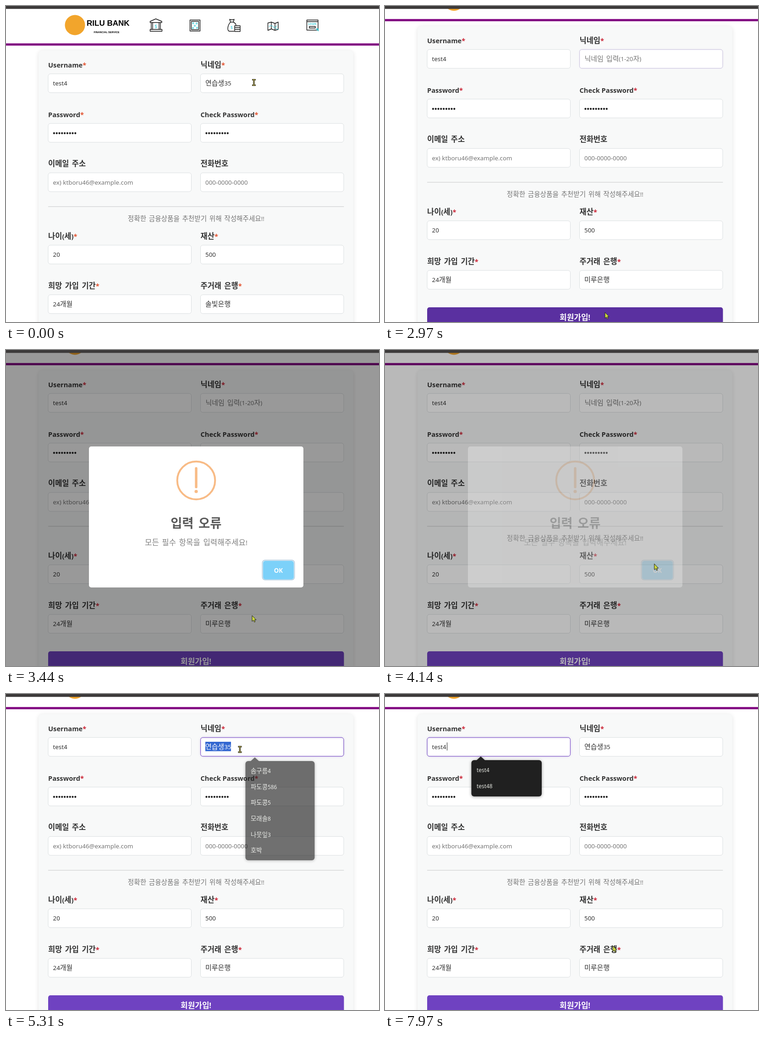
An HTML page that plays this animation: 814x688 px, repeating every 8 s.

```html
<!DOCTYPE html>
<html lang="ko">
<head>
<meta charset="utf-8">
<title>Sign-up form</title>
<style>
  html, body { margin: 0; width: 100%; height: 100%; overflow: hidden; background: #fff; }
  svg { display: block; }
  text { font-family: "Noto Sans", "Open Sans", sans-serif; fill: #333; }
  .korean { word-spacing: .17em; }
  .ko { font-family: "Noto Sans CJK KR", "Noto Sans CJK", sans-serif; }
  .bold { font-weight: 700; }
  .star { fill: var(--star); font-weight: 600; }
  .hint { fill: #757575; }
  .title { fill: #595959; }
  .message { fill: #808080; }
  .white { fill: #fff; }
  .middle { text-anchor: middle; }
  .logo { font-family: "Liberation Sans", Arial, sans-serif; font-weight: 700; fill: #000; }
  .field { fill: #fff; stroke: #dbdfe1; }
  .focus { fill: none; stroke: #7446c6; filter: drop-shadow(0 0 2px #6f42c166); }
  .card { fill: #f8f9f9; filter: drop-shadow(0 1px 4px #0000001c); }
  .line { fill: none; stroke: #151515; stroke-width: 1.4; stroke-linejoin: round; }
  .teal { fill: none; stroke: #35cbd8; stroke-width: 1.2; }
  .tealFill { fill: #35cbd8; }
  .list { filter: drop-shadow(0 1px 3px #0006); }
  .list text { fill: #e4e6e0; }
</style>
</head>
<body>
<script>
const LOOP = 8000, SCROLL = 53;
const LEFT = 92, RIGHT = 424.5, FIELD_W = 312.5, FIELD_H = 41;

// Hangul is set slightly larger than Latin so both look the same size.
function text(x, middleY, string, size, cls = '', star = '') {
  const runs = string.replace(/[가-힣]+/g, run => `<tspan class="ko" font-size="${size}">${run}</tspan>`);
  const mark = star && `<tspan class="star">${star}</tspan>`;
  const script = runs === string ? '' : 'korean';
  return `<text x="${x}" y="${middleY + size * .35}" font-size="${size * .89}" class="${cls} ${script}">${runs}${mark}</text>`;
}
const box = (x, y, w, h, attrs, r = 5) => `<rect x="${x}" y="${y}" width="${w}" height="${h}" rx="${r}" ${attrs}/>`;
const path = (d, cls = 'line') => `<path d="${d}" class="${cls}"/>`;
const frame = (x, y, attrs) => box(x, y - 20.5, FIELD_W, FIELD_H, attrs);

function field(x, labelY, label, star, content) {
  const y = labelY + 40.2;
  return text(x, labelY, label, 16.5, 'bold', star) + frame(x, y, 'class="field"') + content(x + 10.5, y);
}
const value = string => (x, y) => text(x, y, string, 15);
const hint = string => (x, y) => text(x, y, string, 15, 'hint');
const dots = (x, y) => Array.from({ length: 9 }, (_, i) =>
  `<circle cx="${x + 2.4 + i * 5.8}" cy="${y + .8}" r="2.15" fill="#222"/>`).join('');

function suggestions(id, x, y, w, h, names) {
  return `<g id="${id}" class="list">${box(x, y, w, h, 'fill="#202020"', 6)}
    <path d="M${x + 11} ${y + .5}l9.5-8.5 9.5 8.5z" fill="#202020"/>
    ${names.map((name, i) => text(x + 11.5, y + 21.5 + i * 34.6, name, 13.4)).join('')}</g>`;
}

const header = `
  <rect y="81.4" width="814" height="4.8" fill="#800080"/>
  <circle cx="150.5" cy="41.5" r="22" fill="#f2a52c"/>
  <text x="176" y="43" font-size="17" class="logo">RILU BANK</text>
  <text x="191.5" y="59" font-size="5.6" class="logo">FINANCIAL SERVICE</text>
  ${path('M314.5 36V33.5L327 28l13 5.5V36ZM317 36V51M320 36V51M334 36V51M337 36V51M314.5 51H340.500V55H314.500Z')}
  <text x="327" y="48" font-size="10" class="tealFill middle">$</text>
  ${path('M401.5 30.5H423.5V54.5H401.5ZM404.5 33.5H420.5V51.5H404.5Z')}
  ${[[408.5, 37.5], [416, 38], [412, 43], [408, 48], [417, 47.5]].map(([x, y]) =>
    `<circle cx="${x}" cy="${y}" r="1.5" class="teal"/>`).join('')}
  ${path('M490 35C483 42 482 55 488 55H498M496 35Q502 38 502 42M490 35H497M490 35L488 29Q493 31 498 29L496 35M499 43H511V55.5H499ZM499 47H511M499 51H511')}
  <text x="492.5" y="50" font-size="9" class="tealFill middle">$</text>
  ${path('M571.5 37L579 35 587 38 594 35V51L587 53 579 50 571.5 53ZM579 35V50M587 38V53')}
  <g id="pin">${path('M574 45Q579 40 583 45T591 43M588 49L595 51', 'teal')}</g>
  ${path('M656.5 30.5H681V52.5H656.5ZM656.5 34H681M662 44.5H675V48H662Z')}
  <text x="668.5" y="41" font-size="5.5" class="tealFill middle bold">LOGIN</text>
  <path id="pointer" d="M0 0L6 2 4 3.5 6 6 4.5 7 3 4.5 1.5 6Z" class="tealFill"/>`;

const form = `
  ${box(71, 97, 687, 700, 'class="card"', 9)}
  ${field(LEFT, 128, 'Username', '*', value('test4'))}
  ${field(RIGHT, 128, '닉네임', '*', () => '')}
  ${field(LEFT, 236, 'Password', '*', dots)}
  ${field(RIGHT, 236, 'Check Password', '*', dots)}
  ${field(LEFT, 343.5, '이메일 주소', '', hint('ex) ktboru46@example.com'))}
  ${field(RIGHT, 343.5, '전화번호', '', hint('000-0000-0000'))}
  <path d="M92 436.8H737.5" stroke="#c6c8c9"/>
  ${text(414.8, 463, '정확한 금융상품을 추천받기 위해 작성해주세요!!', 14.6, 'hint middle')}
  ${field(LEFT, 501, '나이(세)', '*', value('20'))}
  ${field(RIGHT, 501, '재산', '*', value('500'))}
  ${field(LEFT, 609, '희망 가입 기간', '*', value('24개월'))}
  ${field(RIGHT, 609, '주거래 은행', '*', () => '')}
  <g id="bankBefore">${text(435, 649.2, '솔빛은행', 15)}</g>
  <g id="bankAfter">${text(435, 649.2, '미루은행', 15)}</g>
  ${box(LEFT, 709, 645.5, 45, 'id="submit"')}
  ${text(414.5, 731.5, '회원가입!', 17, 'bold white middle')}
  ${frame(RIGHT, 168.2, 'id="nickFocus" class="focus"')}
  ${frame(LEFT, 168.2, 'id="userFocus" class="focus"')}
  <g id="nickHint">${text(435.5, 167.5, '닉네임 입력(1-20자)', 15, 'hint')}</g>
  <rect id="selection" x="435" y="157" width="56" height="20.5" fill="#3367d1"/>
  <g id="nickDark">${text(435, 167.5, '연습생35', 15)}</g>
  <g id="nickLight">${text(435, 167.5, '연습생35', 15, 'white')}</g>
  <path id="nickCaret" d="M435.5 158.5V177" stroke="#222"/>
  <path id="userCaret" d="M135.5 158.5V176" stroke="#222"/>
  ${suggestions('nickList', 522.5, 199, 151, 216, ['솜구름4', '파도콩586', '파도콩5', '모래솔8', '나뭇잎3', '호박'])}
  ${suggestions('userList', 188.5, 197, 153.5, 79, ['test4', 'test48'])}`;

const dialog = `
  <rect id="shade" y="6" width="814" height="682"/>
  <g id="dialog">
    ${box(181, 210, 468, 307, 'fill="#fff"')}
    <g fill="#f8bb86">
      <circle cx="415" cy="284" r="41.3" fill="none" stroke="#f8bb86" stroke-width="4"/>
      ${box(412.3, 255, 5.4, 46, '', 2.5)}
      <circle cx="415" cy="308" r="3.6"/>
    </g>
    ${text(414.8, 377.5, '입력 오류', 27.4, 'bold title middle')}
    ${text(415, 419, '모든 필수 항목을 입력해주세요!', 16.8, 'message middle')}
    ${box(559.5, 457.5, 70, 43, 'fill="#fff" stroke="#b9d2e4" stroke-width="2"', 6)}
    ${box(561, 459, 67, 40.5, 'fill="#7cd1f9"')}
    ${text(594.5, 480, 'OK', 15, 'bold white middle')}
  </g>`;

document.body.innerHTML = `<svg width="814" height="688" viewBox="0 0 814 688">
  <rect width="814" height="688" fill="#fff"/>
  <g id="page">${header}${form}</g>
  ${dialog}
  <rect width="814" height="6.3" fill="#3c3a3a"/>
  <path id="arrow" d="M0 0V13L3 10.3 5 14.5 7 13.6 5.2 9.5H9Z" fill="#cbd83f" stroke="#222"/>
  <g id="beam" fill="none">
    <path d="M-4-6H4M0-6V6M-4 6H4" stroke="#222" stroke-width="3.2"/>
    <path d="M-3.5-6H3.5M0-6V6M-3.5 6H3.5" stroke="#d8c84a"/>
  </g>
</svg>`;

const el = Object.fromEntries([...document.querySelectorAll('[id]')].map(node => [node.id, node]));
const smooth = u => u * u * (3 - 2 * u);
const ramp = (t, from, to) => smooth(Math.min(1, Math.max(0, (t - from) / (to - from))));
const during = (t, from, to) => t >= from && t < to;
const fade = (id, alpha) => el[id].setAttribute('opacity', +alpha);
const move = (id, x, y) => el[id].setAttribute('transform', `translate(${x} ${y})`);
const blink = (t, from, to) => during(t, from, to) && (t - from) % 1060 < 530;

// time, x, y, shape
const mouse = [
  [0, 541, 166.5, 'beam'], [1500, 541, 166.5, 'beam'], [1820, 581, 255.5, 'beam'],
  [1950, 580, 275, 'arrow'], [2650, 480, 667, 'arrow'], [3150, 480, 667, 'arrow'],
  [3440, 537, 578, 'arrow'], [3800, 590, 474, 'arrow'], [4040, 590, 474, 'arrow'],
  [4280, 584, 452, 'arrow'], [5030, 520, 138, 'beam'], [5200, 510.5, 120.5, 'beam'],
  [5860, 510, 121, 'arrow'], [6380, 228, 153, 'arrow'], [6680, 228, 153, 'beam'],
  [6760, 230, 118, 'beam'], [7000, 230, 118, 'arrow'], [7430, 497, 208, 'arrow'],
  [7700, 540, 370, 'arrow'], [7970, 497, 548, 'arrow'], [LOOP, 497, 548, 'arrow']];

function drawMouse(t) {
  const i = mouse.findIndex(key => key[0] > t);
  const [t0, x0, y0, shape] = mouse[i - 1], [t1, x1, y1] = mouse[i];
  const u = ramp(t, t0, t1);
  for (const id of ['arrow', 'beam']) {
    fade(id, id === shape);
    move(id, x0 + (x1 - x0) * u, y0 + (y1 - y0) * u);
  }
}

function popScale(t) {
  const u = (t - 3050) / 300;
  if (u < .45) return .5 + .55 * ramp(u, 0, .45);
  if (u < .8) return 1.05 - .1 * ramp(u, .45, .8);
  return .95 + .05 * ramp(u, .8, 1);
}

function draw(now) {
  const t = now % LOOP;
  move('page', 0, -SCROLL * ramp(t, 2050, 2250));
  document.body.style.setProperty('--star', t < 2050 ? '#e2522f' : '#cb2536');

  const swing = (1 - Math.cos(t / 1820 * Math.PI)) / 2;
  move('pointer', 677 - 6 * swing, 48 - 3 * swing);
  move('pin', 0, 2 * swing);

  const nickFocus = ramp(t, 150, 300) - ramp(t, 2850, 3020) + ramp(t, 5060, 5200) - ramp(t, 6150, 6300);
  const empty = during(t, 700, 5200);
  const selected = during(t, 350, 700) || during(t, 5200, 6150);
  fade('nickFocus', nickFocus);
  fade('nickHint', during(t, 2850, 5060));
  fade('selection', selected);
  fade('nickLight', selected);
  fade('nickDark', !empty && !selected);
  fade('nickCaret', blink(t, 700, 2850));
  fade('nickList', ramp(t, 5080, 5160) - ramp(t, 5250, 5400));

  fade('userFocus', ramp(t, 6750, 6900));
  fade('userCaret', blink(t, 6750, LOOP));
  fade('userList', ramp(t, 6800, 6920));

  fade('bankBefore', t < 1300);
  fade('bankAfter', t >= 1300);
  const hover = ramp(t, 2580, 2720) - ramp(t, 3050, 3200);
  el.submit.setAttribute('fill', `rgb(${111 - 21 * hover} ${66 - 18 * hover} ${193 - 33 * hover})`);

  fade('shade', .4 * (ramp(t, 3050, 3300) - ramp(t, 4030, 4330)));
  fade('dialog', ramp(t, 3050, 3150) - ramp(t, 4030, 4200));
  el.dialog.setAttribute('transform', `translate(415 363.5) scale(${popScale(t)}) translate(-415 -363.5)`);

  drawMouse(t);
  requestAnimationFrame(draw);
}
requestAnimationFrame(draw);
</script>
</body>
</html>
```
